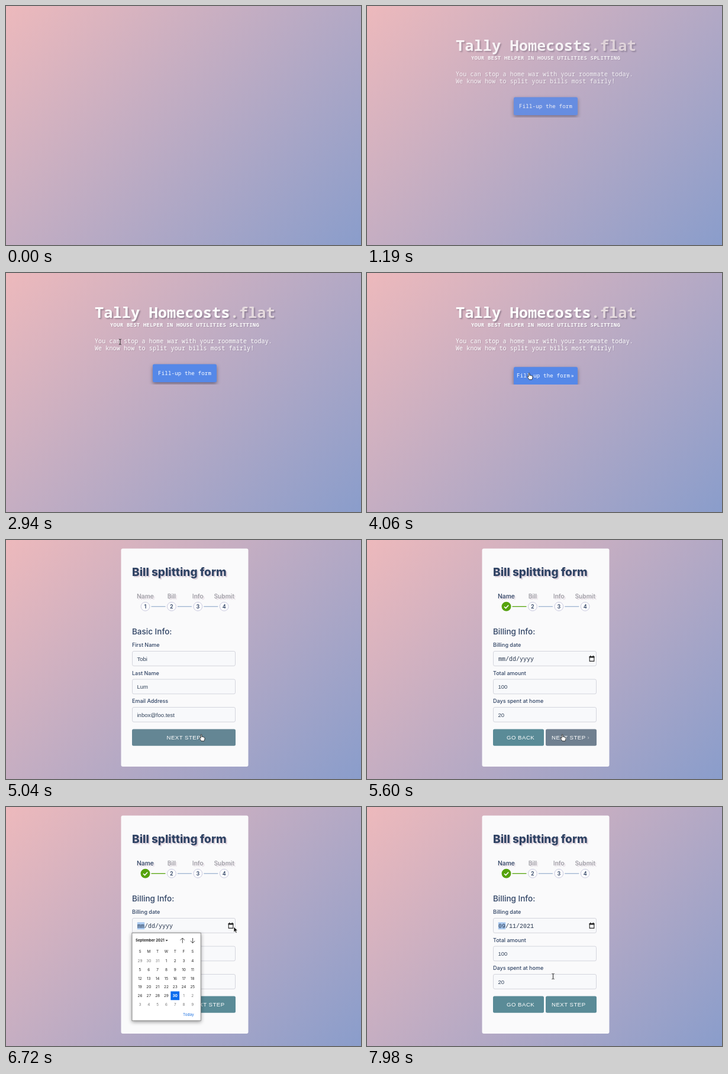
These frames come from a looping animation (600x405 px, 8 s). An HTML page:

```html
<!DOCTYPE html>
<html lang="en">
<head>
<meta charset="utf-8">
<title>Bill splitting form</title>
<style>
html, body { margin: 0; width: 100%; height: 100%; overflow: hidden; }
body { background: linear-gradient(135deg, #edb9bc, #8a9dcb); }
svg { display: block; width: 600px; height: 405px; }
text { white-space: pre; }
.mono { font-family: "Noto Sans Mono", "DejaVu Sans Mono", monospace; fill: #fff; }
.brand { font-size: 25.4px; font-weight: 700; text-shadow: 2px 2px 2px rgba(80, 70, 90, .4); }
.tag { font-size: 9px; font-weight: 700; letter-spacing: .2px; text-shadow: 1px 1px 1px rgba(80, 70, 90, .2); }
.lead { font-size: 10px; letter-spacing: .12px; text-shadow: 1px 1px 1px rgba(80, 70, 90, .2); }
.cta { font-size: 9px; letter-spacing: .23px; }
.ui { font-family: Inter, "Open Sans", sans-serif; fill: #2f4364; }
.heading { font-size: 19px; font-weight: 800; text-shadow: 2px 2px 1px rgba(190, 165, 185, .5); }
.section { font-size: 13.5px; font-weight: 500; }
.label { font-size: 9px; font-weight: 500; }
.step { font-size: 10.3px; font-weight: 500; text-anchor: middle; text-shadow: 2px 2px 1px rgba(190, 165, 185, .4); }
.num { font-size: 9px; font-weight: 600; text-anchor: middle; }
.value { font: 9.5px "Liberation Sans", Arial, sans-serif; fill: #2f4058; }
.date { font: 10px "Liberation Mono", "Courier New", monospace; fill: #27364e; }
.btn { font: 9.6px "Liberation Sans", Arial, sans-serif; letter-spacing: .5px; fill: #fff; }
.cal { font: 6.4px Inter, sans-serif; fill: #222; text-anchor: middle; }
.input { fill: #f8f9fb; stroke: #d4d5dd; }
</style>
</head>
<body>
<svg viewBox="0 0 600 405">
  <defs>
    <clipPath id="heroClip"><rect y="40" width="600" height="149"/></clipPath>
  </defs>

  <g id="home" clip-path="url(#heroClip)">
    <text class="mono brand" x="150" y="76">Tally Homecosts<tspan fill="#e5dade">.flat</tspan></text>
    <text class="mono tag" x="176" y="91.3">YOUR BEST HELPER IN HOUSE UTILITIES SPLITTING</text>
    <text class="mono lead" x="150" y="119.3">You can stop a home war with your roommate today.</text>
    <text class="mono lead" x="150" y="130.5">We know how to split your bills most fairly!</text>
    <g id="cta">
      <rect x="248" y="154.5" width="108" height="30.5" rx="2.5" fill="#5588e8" style="filter:drop-shadow(0 3px 3px rgba(50,45,65,.55))"/>
      <text id="ctaText" class="mono cta" x="257" y="172.8">Fill-up the form</text>
      <text id="ctaMark" class="mono cta" x="344.5" y="177.8" dy="-5">»</text>
    </g>
  </g>

  <g id="form">
    <rect x="194.5" y="14.5" width="215" height="369.5" rx="3" fill="#fafafb"/>
    <text class="ui heading" x="213" y="61.3">Bill splitting form</text>
    <g id="steps"></g>
    <g id="page1"></g>
    <g id="page2"></g>
    <g id="calendar"></g>
  </g>

  <g id="cursor">
    <path id="arrow" d="M0 0V9.2L2.1 7.2 3.6 10.6 5.2 9.9 3.7 6.6H6.6Z" fill="#111" stroke="#fff" stroke-width=".7"/>
    <path id="hand" d="M-.9 1C-.9-.4.9-.4.9 1V4.2C1.4 3.4 2.6 3.6 2.7 4.5 3.3 3.9 4.3 4.2 4.4 5 5 4.6 5.9 5 5.9 5.8V8C5.9 9.2 5 10 4.8 11.2H.1C-.4 9.6-2.6 7.6-3 6.4-3.2 5.4-2 5.2-.9 6.6Z" fill="#fff" stroke="#111" stroke-width=".8"/>
    <path id="beam" d="M-2-4.6Q0-4.6 0-3.4Q0-4.6 2-4.6M0-3.4V3.4M-2 4.6Q0 4.6 0 3.4Q0 4.6 2 4.6" fill="none" stroke="#222" stroke-width="1"/>
  </g>
</svg>

<script>
const LOOP = 8000, TICK = 70;
const PRESS = 3990, RELEASE = 4130, PAGE2 = 5390, CAL_OPEN = 6370, CAL_CLOSE = 7630;
const TEAL = [90, 139, 151], SLATE = [112, 128, 144];

const $ = id => document.getElementById(id);
const text = (cls, x, y, s, extra = '') => `<text class="${cls}" x="${x}" y="${y}" ${extra}>${s}</text>`;
const rect = (x, y, w, h, extra) => `<rect x="${x}" y="${y}" width="${w}" height="${h}" ${extra}/>`;

const field = (row, label, value = '') => {
  const y = 188.5 + row * 47.5;
  return text('ui label', 213, y - 7.2, label) +
    rect(213.5, y, 174, 24.8, 'rx="2.5" class="input"') +
    text('value', 221.5, y + 16, value);
};
const button = (id, x, w, textX, label) =>
  rect(x, 320.5, w, 28.3, `id="${id}" rx="2.5" fill="rgb(${TEAL})"`) + text('btn', textX, 338.3, label);

function buildSteps() {
  const x = i => 235.5 + i * 44.4;
  $('steps').innerHTML = ['Name', 'Bill', 'Info', 'Submit'].map((name, i) =>
    (i < 3 ? `<path ${i ? '' : 'id="link"'} d="M${x(i) + 10} 112.7h24" stroke="#9db4d0" stroke-width="1.3"/>` : '') +
    text('ui step', x(i), 99, name, (i ? '' : 'id="stepName" ') + 'style="fill:#9b9ba2"') +
    `<circle cx="${x(i)}" cy="112.7" r="7.4" fill="#fdfdfe" stroke="#c9c9df"/>` +
    text('ui num', x(i), 116, i + 1)
  ).join('') +
  `<g id="done"><circle cx="235.5" cy="112.7" r="7.9" fill="#55a30c"/>
   <path d="M232 113l2.5 2.5 4.7-5" fill="none" stroke="#fff" stroke-width="1.7"/></g>`;
}

function buildPages() {
  $('page1').innerHTML = text('ui section', 213, 160, 'Basic Info:') +
    field(0, 'First Name', 'Tobi') + field(1, 'Last Name', 'Lum') +
    field(2, 'Email Address', 'inbox@foo.test') +
    button('next1', 213, 175, 271.5, 'NEXT STEP');

  $('page2').innerHTML = text('ui section', 213, 160, 'Billing Info:') +
    field(0, 'Billing date') + field(1, 'Total amount', '100') + field(2, 'Days spent at home', '20') +
    rect(221.8, 195.3, 12.4, 12, 'id="mark" fill="#a9c9f0"') +
    text('date', 222, 204.7, '', 'id="date"') +
    `<path d="M376.2 197.8h7.6v7.6h-7.6z" fill="none" stroke="#222" stroke-width="1.1"/>
     <path d="M375.7 197h8.6v2.6h-8.6zM377 195.8h1.3v2H377zM381.7 195.8h1.3v2h-1.3z" fill="#222"/>` +
    button('back', 213, 86, 236, 'GO BACK') + button('next2', 302, 86, 312, 'NEXT STEP') +
    text('btn', 372.5, 338, '›', 'id="chevron"');
}

function buildCalendar() {
  const x = col => 226.5 + col * 14.8, y = row => 263 + row * 14.8;
  let out = rect(213, 213.3, 116.2, 148.7,
    'fill="#fff" stroke="#777" stroke-width=".8" style="filter:drop-shadow(0 2px 3px rgba(0,0,0,.4))"');
  out += text('cal', 219, 228.4, 'September 2021', 'style="font-size:6.1px;font-weight:700;text-anchor:start"');
  out += `<path d="M269.6 225.2h4l-2 2.2z" fill="#222"/>
    <path d="M298.3 230.6v-8.6m-3.6 3.7 3.6-3.7 3.6 3.7M315.6 222v8.6m-3.6-3.7 3.6 3.7 3.6-3.7" fill="none" stroke="#333" stroke-width=".9"/>`;
  [...'SMTWTFS'].forEach((d, i) => out += text('cal', x(i), 247.3, d));
  out += rect(0, 0, 14.8, 14.8, 'id="hoverDay" fill="#e4e6ea"');
  for (let i = 0; i < 42; i++) {
    const col = i % 7, row = Math.floor(i / 7), d = i - 2;
    const day = d < 1 ? d + 31 : d > 30 ? d - 30 : d, today = d === 30;
    if (today) out += rect(x(col) - 7.4, y(row) - 9.8, 14.8, 14.8, 'fill="#0a6cee"');
    const style = today ? 'fill:#fff;font-weight:700' : day !== d ? 'fill:#777' : '';
    out += text('cal', x(col), y(row), day, `style="${style}"`);
  }
  $('calendar').innerHTML = out + text('cal', 308.3, 353.6, 'Today', 'style="fill:#1a6fe0"');
}

buildSteps();
buildPages();
buildCalendar();

const ramp = (t, from, to) => Math.min(1, Math.max(0, (t - from) / (to - from)));
const smooth = p => p * p * (3 - 2 * p);
const mix = (a, b, p) => `rgb(${a.map((v, i) => Math.round(v + (b[i] - v) * p))})`;
const show = (id, on) => $(id).style.display = on ? '' : 'none';
const inside = ([x, y], l, t, r, b) => x >= l && x <= r && y >= t && y <= b;

// Pointer stops: time, x, y
const route = [
  [2030, 24, 7], [3500, 274, 169.5], [4550, 274, 169.5], [4970, 330, 329.5], [5750, 330, 329.5],
  [6200, 385, 203], [6800, 385, 203], [7500, 315, 275], [7700, 315, 275], [7980, 314.5, 287]
];

function pointerAt(t) {
  const next = route.findIndex(stop => stop[0] >= t);
  if (next < 0) return route[route.length - 1].slice(1);
  if (next === 0) return route[0].slice(1);
  const a = route[next - 1], b = route[next], p = smooth(ramp(t, a[0], b[0]));
  return [a[1] + (b[1] - a[1]) * p, a[2] + (b[2] - a[2]) * p];
}

function pointerKind(pos, t) {
  if (t < RELEASE) {
    if (inside(pos, 248, 154, 356, 189)) return 'hand';
    return inside(pos, 150, 54, 455, 133) ? 'beam' : 'arrow';
  }
  if (t >= CAL_OPEN && t < CAL_CLOSE) return 'arrow';
  if (inside(pos, 213, 320, 388, 349)) return 'hand';
  if (t >= PAGE2 && inside(pos, 374, 189, 388, 213)) return 'arrow';
  const overField = [0, 1, 2].some(i => inside(pos, 213, 188 + i * 47.5, 388, 213.5 + i * 47.5));
  return overField ? 'beam' : 'arrow';
}

function render(time) {
  const t = Math.floor(time / TICK) * TICK;
  const onPage2 = t >= PAGE2, calendarOpen = t >= CAL_OPEN && t < CAL_CLOSE;

  $('home').style.opacity = smooth(ramp(t, 280, 1500)) * (1 - ramp(t, RELEASE, RELEASE + 140));
  const hover = smooth(ramp(t, 3290, 3590));
  const pressed = t >= PRESS && t < RELEASE;
  $('cta').setAttribute('transform', `translate(0 ${pressed ? 4.7 : 0})`);
  $('ctaText').setAttribute('x', 257 - 4 * hover);
  $('ctaMark').style.opacity = hover;

  $('form').style.opacity = ramp(t, RELEASE, RELEASE + 280);
  show('page1', !onPage2);
  show('page2', onPage2);
  show('done', onPage2);
  show('calendar', calendarOpen);
  $('stepName').style.fill = onPage2 ? '#2f4364' : '#9b9ba2';
  $('link').setAttribute('stroke', onPage2 ? '#55a30c' : '#9db4d0');

  const leave = 1 - ramp(t, 5850, 6150);
  $('next1').setAttribute('fill', mix(TEAL, SLATE, ramp(t, 4900, 5200)));
  $('next2').setAttribute('fill', mix(TEAL, SLATE, leave));
  $('chevron').style.opacity = .6 * leave;
  $('date').textContent = t >= CAL_CLOSE ? '09/11/2021' : 'mm/dd/yyyy';
  show('mark', t >= CAL_OPEN);

  const pos = pointerAt(t), kind = pointerKind(pos, t);
  show('cursor', t >= 2030);
  $('cursor').setAttribute('transform', `translate(${pos})`);
  ['arrow', 'hand', 'beam'].forEach(name => show(name, name === kind));

  const col = Math.floor((pos[0] - 219.1) / 14.8), row = Math.floor((pos[1] - 253.2) / 14.8);
  show('hoverDay', col >= 0 && col < 7 && row >= 0 && row < 6);
  $('hoverDay').setAttribute('x', 219.1 + col * 14.8);
  $('hoverDay').setAttribute('y', 253.2 + row * 14.8);
}

const start = performance.now();
function frame() {
  render((performance.now() - start) % LOOP);
  requestAnimationFrame(frame);
}
frame();
</script>
</body>
</html>
```
